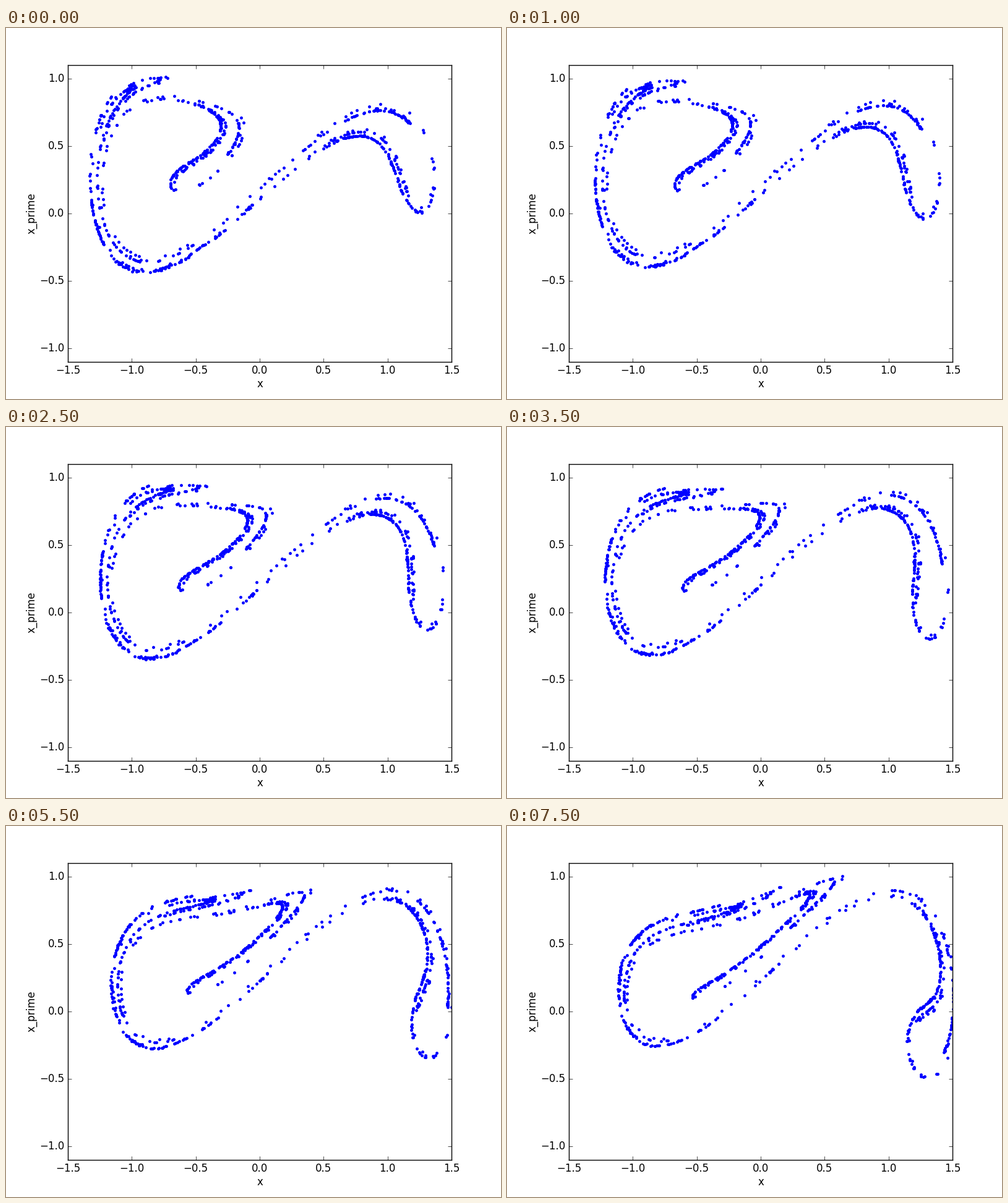
Animation of 800 by 600 pixels, one loop 8 s. Source, as a matplotlib script:

```python
"""Stroboscopic sections of the forced Duffing oscillator, phase by phase."""
import math

import numpy as np
import matplotlib.pyplot as plt
from matplotlib.animation import FuncAnimation

DELTA, GAMMA, OMEGA = 0.25, 0.40, 1.0
STEPS = 100            # integration steps per forcing period
FRAMES, INTERVAL = 16, 500
SETTLE, POINTS = 12, 800
H = 2 * math.pi / OMEGA / STEPS


def slope(state, t):
    x, v = state
    return np.array([v, x - x ** 3 - DELTA * v + GAMMA * math.cos(OMEGA * t)])


def rk4(state, t):
    k1 = slope(state, t)
    k2 = slope(state + H / 2 * k1, t + H / 2)
    k3 = slope(state + H / 2 * k2, t + H / 2)
    k4 = slope(state + H * k3, t + H)
    return state + H / 6 * (k1 + 2 * k2 + 2 * k3 + k4)


def sections():
    """Let random starts settle on the attractor, then follow them."""
    state = np.random.default_rng(3).uniform(-1, 1, (2, POINTS))
    for n in range(SETTLE * STEPS):
        state = rk4(state, n * H)
    out = [state]
    for n in range(FRAMES - 1):
        out.append(rk4(out[-1], n * H))
    return out


states = sections()

plt.style.use("classic")
plt.rcParams.update({"font.family": "DejaVu Sans",
                     "axes.labelpad": 3,
                     "xtick.major.pad": 3.5})
fig = plt.figure(figsize=(8, 6), dpi=100, facecolor="white")
ax = fig.add_subplot(111)
ax.set_xlim(-1.5, 1.5)
ax.set_ylim(-1.1, 1.1)
ax.set_xlabel("x")
ax.set_ylabel("x_prime")
dots, = ax.plot([], [], "b.")


def update(i):
    dots.set_data(*states[i])
    return dots,


anim = FuncAnimation(fig, update, frames=FRAMES, interval=INTERVAL,
                     repeat=True, repeat_delay=0)
plt.show()
```
